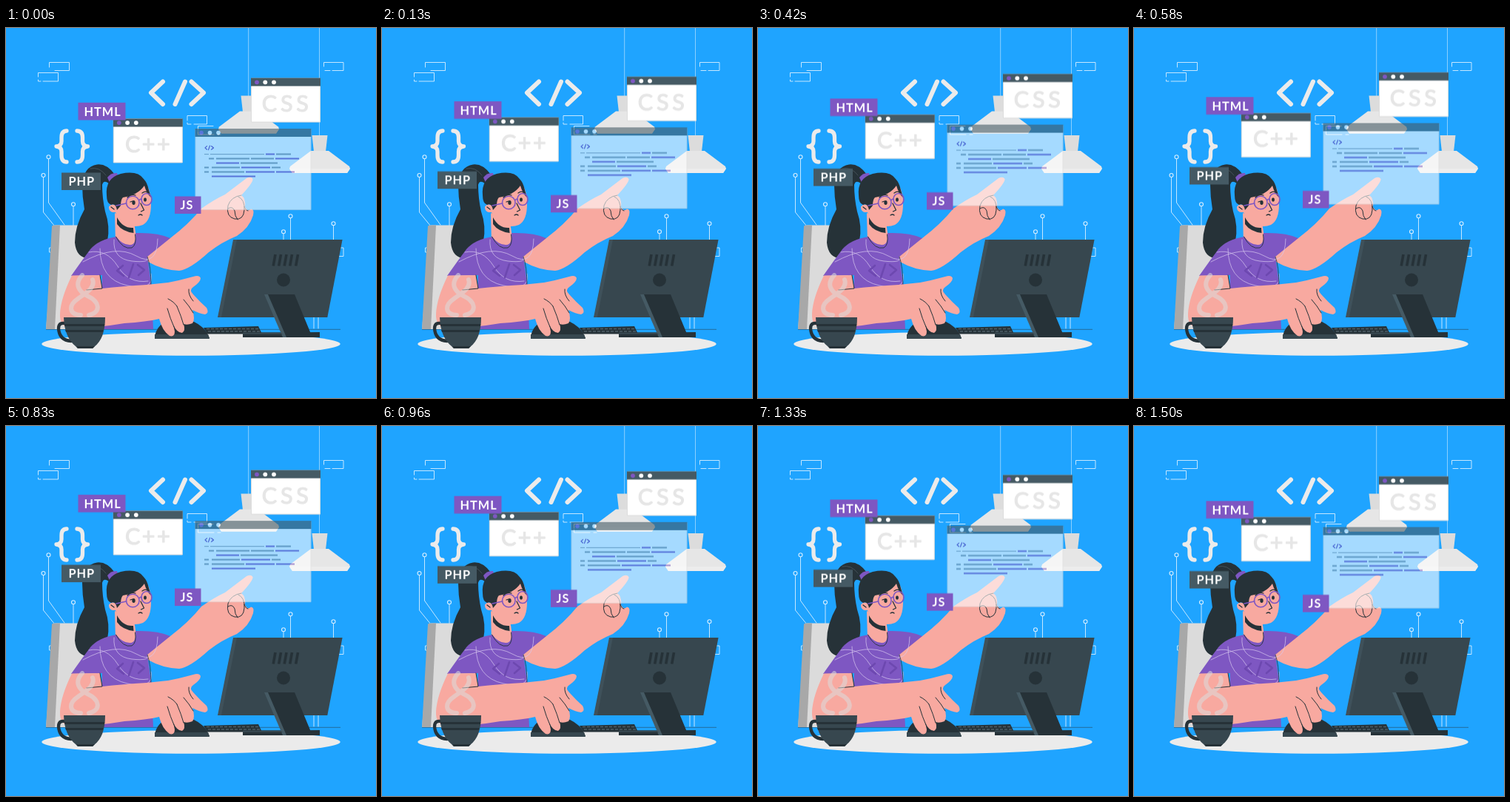
Animation, 500 px wide and 500 px high, one loop 1540 ms. Source, as an HTML page:

```html
<!DOCTYPE html>
<html lang="en">
<head>
<meta charset="utf-8">
<title>Coding desk</title>
<style>
  html, body { margin: 0; width: 100%; height: 100%; overflow: hidden; background: #1fa4ff; }
  svg { display: block; width: 100vw; height: 100vh; }
  text { font-family: Lato, sans-serif; stroke-linejoin: round; }
  .tag { font-size: 16.3px; font-weight: 700; fill: #fff; letter-spacing: 1px; }
  .big { font-size: 30.5px; fill: #e6e6e6; stroke: #e6e6e6; stroke-width: 1.2px; }
  .line { fill: none; stroke-linecap: round; stroke-linejoin: round; }
  .float { animation: float 770ms linear -50ms infinite alternate; }
  @keyframes float {
    from { transform: translateY(.25px); }
    to { transform: translateY(-9.75px); }
  }
  .skin { fill: #f8a9a0; }
  .ink { fill: #263238; }
  .slate { fill: #37474f; }
  .steel { fill: #455a64; }
  .violet { fill: #7e57c2; }
</style>
</head>
<body>
<svg viewBox="0 0 500 500">
  <defs>
    <g id="lamp">
      <path d="M413.500 145H434.500L432 167H416Z" fill="#dcdcdc"/>
      <path d="M412 166H436L464 187L465 190L461 196H387L383 190L384 187Z" fill="#e6e6e6"/>
      <path d="M383 190H465L461 196H387Z" fill="#ececec"/>
    </g>
    <g id="window">
      <path d="M.5 .5H93.500V59.500H.5Z" fill="#fff" stroke="#dcdcdc"/>
      <path class="steel" d="M0 0H94V11H0Z"/>
      <circle cx="8" cy="5.700" r="2.900" class="violet"/>
      <g fill="#fff"><circle cx="19.300" cy="5.700" r="2.900"/><circle cx="31" cy="5.700" r="2.900"/></g>
    </g>
  </defs>

  <rect width="500" height="500" fill="#1fa4ff"/>

  <!-- wall -->
  <g class="line" stroke="#d9efff" stroke-width=".9">
    <path d="M58.500 53V46.500H85.500V57.500H66M43.500 66V60.500H70.500V72H50M47 72H43.500V70"/>
    <path d="M429.500 52V46.500H456V57.500H441M438 57.500H431"/>
    <path d="M245 125V118.500H271.500V130H254M250 130H245V128M259.500 138V132.500H280M259.500 140V144H281M286 144H290"/>
    <path d="M62 297H58.500V303H62M440 297H456V308.500H438"/>
    <path d="M57.500 177V236L79 266M50.500 202V249L66 268M91 241V268M384.500 257V287M375 278V287M442.500 267V287M416 385V406M422 385V406"/>
    <g stroke-width="1.100">
      <circle cx="57.500" cy="174.300" r="2.500"/><circle cx="50.500" cy="199" r="2.500"/>
      <circle cx="91" cy="238.300" r="2.500"/><circle cx="384.500" cy="254.300" r="2.500"/>
      <circle cx="375" cy="275.300" r="2.500"/><circle cx="442.500" cy="264.300" r="2.500"/>
    </g>
    <path d="M327.700 0V92M423.500 0V145" opacity=".65"/>
  </g>
  <use href="#lamp" x="-96" y="-53.500"/>
  <use href="#lamp"/>

  <g class="line" stroke="#ebebeb" stroke-width="6">
    <path d="M212 72.500L196 87.500L212 103M242 72.500L228.500 103M250.500 72.500L267 87.500L250.500 103"/>
    <path stroke-width="5.300" d="M82 139Q75 139 75 148V153Q75 159.500 68 160Q75 160.500 75 167V172Q75 181 82 181M96 139Q103.500 139 103.500 148V153Q103.500 159.500 110.500 160Q103.500 160.500 103.500 167V172Q103.500 181 96 181"/>
  </g>
  <path d="M54 407.300H452" stroke="#263238" stroke-width=".5"/>

  <!-- chair -->
  <path d="M66 266.500H112L132 407H54Z" fill="#dbdbdb"/>
  <path d="M62 267.500Q63 266 73 266.500L66 407H54Z" fill="#a8a8a8"/>

  <!-- desk -->
  <ellipse cx="250" cy="427" rx="201.700" ry="15.700" fill="#ebebeb"/>

  <!-- person -->
  <g>
    <path class="ink" d="M147 198Q136 183 123 184.500Q105 187 103 212Q103 228 106 245Q93 268 93 290Q95 311 112 311Q131 308 137 288Q141 268 134 248Q130 230 130 212Q132 204 140 211Z"/>
    <path class="line" d="M114 190Q126 187 135 199" stroke="#4c5960" stroke-width=".8"/>
    <path class="violet" d="M137 202Q142 195 150 196L152 203L141 211Z"/>

    <path class="skin" d="M222 284Q247 265 264 244Q281 232 296 225L325 203Q331 200 333.500 204Q334 209 318 226Q324 230 323 242Q327 249 331 244.500Q336 245 334 253Q329 270 312 281Q292 289 274 303Q249 326 234 328Q211 327 192 316L185 300Z"/>
    <path class="skin" d="M147 250L148 290L164 300L177 290L173 262Z"/>
    <path class="ink" d="M150 256Q158 271 172 270L172.500 277Q157 275 150 265Z"/>
    <path class="violet" d="M149 282Q125 286 114 299Q102 315 88 335L130 334L128 407H199L196 345L191 309L222 284Q205 276 175 277Q176 294 167 293Q157 293 149 282Z"/>
    <path class="line" d="M148.500 282Q158 300 170 297Q177 293 174.500 279" stroke="#263238" stroke-width=".9"/>
    <g class="line" stroke="#d8c9f0" stroke-width=".7">
      <path d="M112 303Q136 298 151 322T192 342M104 316Q148 292 176 308T205 285M127 298Q127 340 164 348T196 332M146 286Q144 312 170 315T191 309"/>
    </g>
    <path class="line" d="M158 321L150 328L159 335M172 319L166 337M178 320L187 327L179 334" stroke="#6d48b0" stroke-width="2.600"/>
    <path class="line" d="M191 309Q196 322 196 349" stroke="#263238" stroke-width=".8"/>

    <!-- head -->
    <path class="skin" d="M148 219L190 211Q197 225 196 238Q196 260 185 266Q173 271 160 264Q150 257 148 249Q139 250 139 242Q142 236 149 240Z"/>
    <path class="ink" d="M136 226Q134 203 155 197Q178 192 186 204Q191 209 193 219L196 229Q190 224 187 213Q178 226 158 229Q155 232 155 240L150 246Q148 236 142 239Q136 237 136 226Z"/>
    <g class="line" stroke="#7e57c2" stroke-width="1.600">
      <circle cx="171.300" cy="236" r="8.800"/><ellipse cx="190" cy="231.500" rx="7" ry="8"/>
      <path d="M162.500 237L149 240M180 233Q181.500 230 183.500 232"/>
    </g>
    <ellipse class="ink" cx="172.500" cy="236" rx="2.200" ry="2.900"/>
    <ellipse class="ink" cx="188" cy="232" rx="2" ry="2.700"/>
    <path class="line" d="M164 229Q169 224 175 226M184 223Q188 220 191 222M182 237L186.500 246L182.500 248M168 235L171 234M179 253Q182 251 184 253M142 242L146 245" stroke="#263238" stroke-width="1.300"/>

    <!-- pointing hand -->
    <path class="line" d="M318 226Q304 228 300 240Q297 255 309 258Q321 260 322 246Q323 232 314 228M300 244Q306 240 309 247Q309 254 313 259M322 241Q324 247 327 247" stroke="#263238" stroke-width="1"/>
  </g>

  <!-- mouse and keyboard -->
  <path class="ink" d="M201 418Q203 400 222 395Q250 390 266 405Q272 411 275 419Z"/>
  <path class="slate" d="M201 414H273L275 420H201Z"/>
  <path class="ink" d="M267 405L341 403L346 413.500H272Z"/>
  <path d="M271 406.500H342M273 410H344" stroke="#4e5d65" stroke-width="1.300" stroke-dasharray="4 2"/>

  <!-- typing arm -->
  <path class="skin" d="M89 334.500Q74 365 73 386Q72 404 88 406Q125 405 160 399Q190 397 207 393Q211 409 221 416Q228 418 228 410L226 401Q231 412 238 412Q243 409 240 400Q245 402 252 399Q256 394 252 381Q261 386 269 387Q275 385 271 378Q262 370 253 360Q247 354 253 350Q263 343 263 338Q261 333 253 336Q235 341 219 344L190 347Q158 349 130 352L127 334Z"/>
  <path class="line" d="M218 379Q222 393 227 404M231 376Q237 390 240 401M240 367Q248 376 253 385M219 366Q227 370 231 376M247 353Q246 361 253 369M127 334L130 352L109 354" stroke="#263238" stroke-width="1"/>

  <!-- cup -->
  <g class="line" stroke="#dcdcdc" opacity=".55" stroke-width="6">
    <path d="M103 334C92 346 98 356 110 362C127 370 129 384 112 388"/>
    <path d="M117 340C121 351 108 358 97 366C84 375 85 387 101 388"/>
  </g>
  <path class="line" d="M83 400Q71 396 71 406Q72 422 88 423" stroke="#263238" stroke-width="4.300"/>
  <path class="slate" d="M78 391H134Q134 420 119 431L117 433H97L94 430Q79 418 78 391Z"/>
  <path class="ink" d="M79 400H133.300L132.800 403H79.500ZM80 408H131.500L130.500 411H81ZM95 430H120L117 433H97Z"/>

  <!-- monitor -->
  <path d="M307 286H320L302 391H286Z" fill="#3f515a"/>
  <path class="slate" d="M312 286H454.600L434.300 391H291Z"/>
  <path class="ink" d="M320 411.500H376L424 411V418H320Z"/>
  <path class="steel" d="M349 360H360L385 418H374Z"/>
  <path class="ink" d="M354 360H390L414 418H379Z"/>
  <path class="slate" d="M320 411.500H371L374 414H320Z"/>
  <path class="line" d="M364 306L361.200 321.500M371.500 306L368.700 321.500M379 306L376.200 321.500M386.500 306L383.700 321.500M394.500 306L391.700 321.500" stroke="#263238" stroke-width="3.600" style="stroke-linecap:butt"/>
  <circle class="ink" cx="375" cy="340.500" r="9"/>

  <!-- floating cards -->
  <g class="float">
    <use href="#window" x="331" y="68"/>
    <text class="big" x="345.800" y="113" letter-spacing="4.800">CSS</text>
    <use href="#window" x="144.800" y="122.800"/>
    <text class="big" x="161" y="168" letter-spacing="2.500">C++</text>

    <g opacity=".6">
      <path d="M256 137H412V246H256Z" fill="#fff" stroke="#e0e0e0"/>
      <path class="steel" d="M255.500 136.500H412.500V147.500H255.500Z"/>
      <circle class="violet" cx="264" cy="142" r="2.800"/>
      <g fill="#fff"><circle cx="275.500" cy="142" r="2.800"/><circle cx="287" cy="142" r="2.800"/></g>
      <path class="line" d="M271.500 160L269 162.300L271.500 164.600M275.500 159.500L273.500 165M277.500 160L280.500 162.300L277.500 164.600" stroke="#5e35b1" stroke-width="1.200"/>
      <path d="M268 171H274M276 171H349" stroke="#90989f" stroke-width="1"/>
      <path d="M365 171H385M274 177H281M284 177H329M331 177H362M317 183H367M268 189H274M278 189H316M359 189H371M268 195H274M278 195H322" stroke="#8a949d" stroke-width="2"/>
      <path d="M351 171H363M364 177H396M284 183H315M318 189H357M324 195H363M365 195H390M278 201H337" stroke="#7e57c2" stroke-width="2"/>
    </g>

    <path class="violet" d="M97.500 101H161.500V125H97.500ZM228 228H263.500V251.500H228Z"/>
    <path class="steel" d="M75 196H128V219.500H75Z"/>
    <text class="tag" x="105.500" y="119">HTML</text>
    <text class="tag" x="84.500" y="213.800" letter-spacing=".5">PHP</text>
    <text class="tag" x="235.500" y="245.800">JS</text>
  </g>
</svg>
</body>
</html>
```
